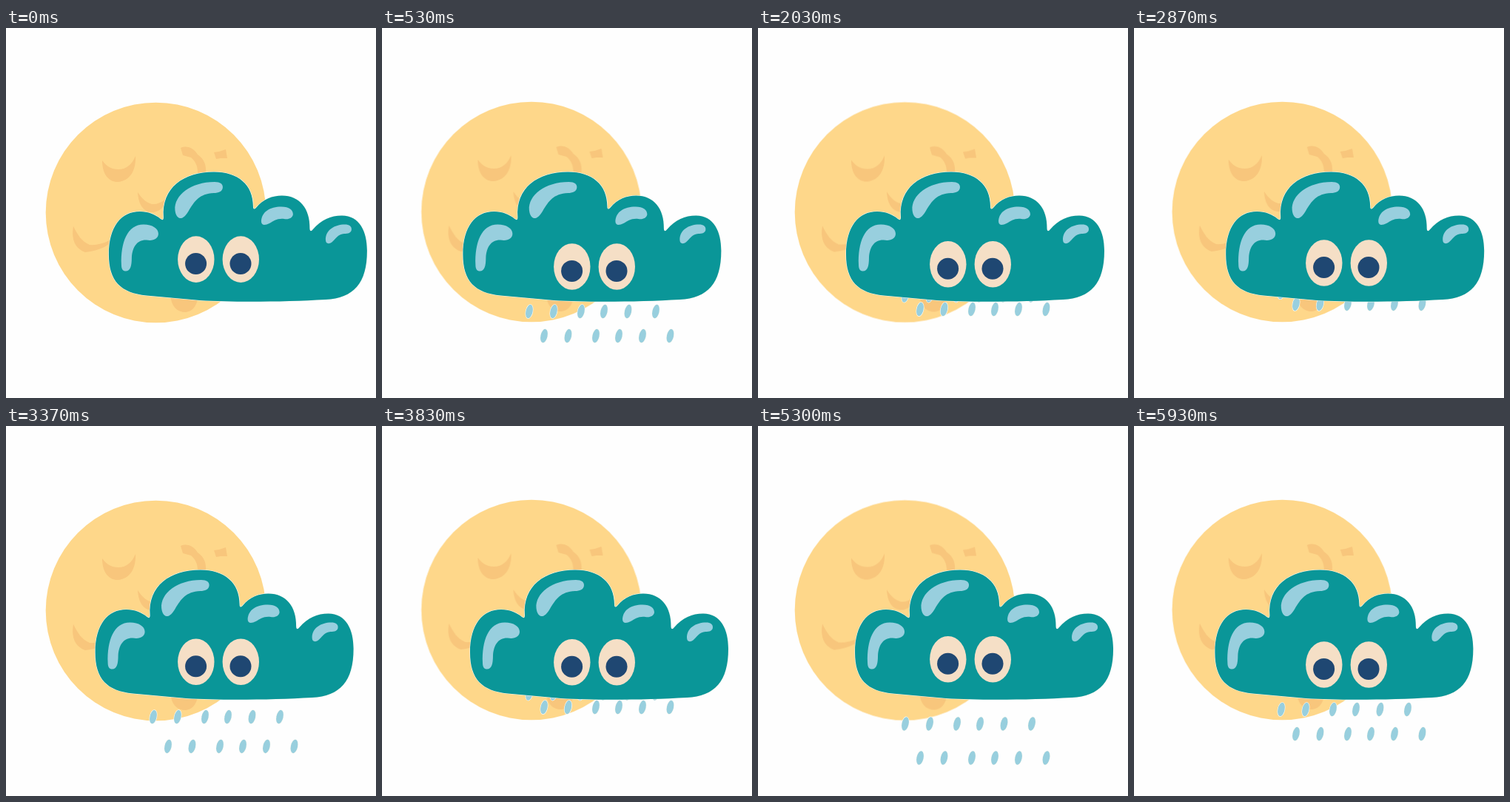
These frames come from a looping animation (500 px wide and 500 px high, 5960 ms). An HTML page without scripts:

```html
<!DOCTYPE html>
<html lang="en">
<head>
<meta charset="utf-8">
<title>Rain cloud and moon</title>
<style>
  @property --swing { syntax: "<number>"; inherits: true; initial-value: 0; }
  @property --fall { syntax: "<number>"; inherits: true; initial-value: 0; }

  html, body { margin: 0; width: 100%; height: 100%; overflow: hidden; background: #fefefe; }

  svg {
    display: block;
    width: 100%;
    height: 100%;
    animation: swing 5.96s linear infinite, fall 5.96s linear infinite;
  }

  .moon { fill: #fed78a; animation: wobble 5.96s step-end infinite; }
  .craters { fill: #f8c67c; }
  .cloud { transform: translateX(calc(var(--swing) * -37.5px)); }
  .body, .drops { stroke: #fdfaf2; stroke-width: 1.2; stroke-linejoin: round; paint-order: stroke; }
  .body { fill: #0a9698; }
  .shine, .drops { fill: #98cfde; }
  .eyes { fill: #f5dfc6; transform: translateY(calc(var(--swing) * 12.5px)); }
  .pupils { fill: #1f4772; }
  .near { transform: translateY(calc(352.4px + var(--fall) * 108px)); }
  .far { transform: translateY(calc(345px + var(--fall) * 64.5px)); }

  /* 900 ms cycles, the last one cut short by the loop */
  @keyframes swing {
    0%, 15.1007%, 30.2013%, 45.302%, 60.4027%, 75.5034%, 90.604% { --swing: 0; }
    7.2651%, 22.3658%, 37.4664%, 52.5671%, 67.6678%, 82.7685%, 97.8691% { --swing: 1; }
    100% { --swing: .728; }
  }

  @keyframes fall {
    0%, 15.1007%, 30.2013%, 45.302%, 60.4027%, 75.5034%, 90.604% { --fall: 0; }
    15.1%, 30.2%, 45.301%, 60.402%, 75.503%, 90.603% { --fall: 1; }
    100% { --fall: .622; }
  }

  /* six poses of 500 ms */
  @keyframes wobble {
    0%, 50.3356% { transform: translate(0, 0); }
    8.3893%, 58.7248% { transform: translate(-.5px, -1px); }
    16.7785%, 67.1141% { transform: translate(-1.2px, -1px); }
    25.1678%, 75.5034% { transform: translate(-3px, -1px); }
    33.557%, 83.8926% { transform: translate(-4px, -.5px); }
    41.9463%, 92.2819% { transform: translate(-2.2px, -1px); }
  }
</style>
</head>
<body>
<svg viewBox="0 0 500 500">
  <defs>
    <filter id="rough" color-interpolation-filters="sRGB">
      <feTurbulence type="fractalNoise" baseFrequency=".09" numOctaves="2" seed="4"/>
      <feDisplacementMap in="SourceGraphic" scale="1.5" xChannelSelector="R" yChannelSelector="G"/>
    </filter>
    <ellipse id="drop" rx="4.6" ry="9.4" transform="rotate(12)"/>
  </defs>

  <g class="moon">
    <g filter="url(#rough)">
      <circle cx="202.5" cy="249.5" r="148.8"/>
      <g class="craters">
        <path d="M130 179C130 198 139 208 151 208C167 207 176 193 175 173C170 185 162 191 152 191C142 191 136 187 130 179Z"/>
        <path d="M236 162C246 158 254 163 259 171C268 177 271 186 270 196L259 196C259 186 256 180 250 175L239 172Z"/>
        <path d="M281 168L288 167L297 164L299 176L290 176L284 177Z"/>
        <path d="M178 222C179 240 187 250 200 249Q214 246 216 231Q206 239 197 238Q186 235 178 222Z"/>
        <path d="M91 268C88 285 93 298 107 303Q130 300 140 291V287Q126 294 113 293C102 288 97 280 91 268Z"/>
        <path d="M222 360Q224 384 243 384Q256 382 259 366Z"/>
      </g>
    </g>
  </g>

  <g class="drops">
    <g class="far">
      <use href="#drop" x="199"/><use href="#drop" x="232"/><use href="#drop" x="269"/>
      <use href="#drop" x="300"/><use href="#drop" x="332.5"/><use href="#drop" x="370"/>
    </g>
    <g class="near">
      <use href="#drop" x="219"/><use href="#drop" x="251.5"/><use href="#drop" x="289"/>
      <use href="#drop" x="320"/><use href="#drop" x="352"/><use href="#drop" x="389.5"/>
    </g>
  </g>

  <g class="cloud">
    <path class="body" d="M139 306C139 268 156 248 181 248C192 248 202 252 209 258Q213 261 213 256C210 216 240 194.500 281 194.500C314 194.500 334 212 334 241Q334 247 338 243C348 231 360 226.500 373 226.500C397 226.500 411 244 410.500 271Q411 277 415 272C426 259 439 253.500 454 253.500C478 253.500 488 275 488 301C488 345 470 365 432 367C380 370 310 371 262 368L190 361.500C155 358 139 342 139 306Z"/>
    <g class="shine">
      <path d="M156 320C155 290 164 265.500 186 265.500C198 265.500 206 271 206 278C206 285 199 288 190 286.500C177 286 171 296 170 310C170 322 168 328.500 162 328.500C158 328.500 156 326 156 320Z"/>
      <path d="M228.500 246C227 226 250 208 282 208C290 208 293 211 293 215C293 221 287 223 281 223C261 224 255 234 247 247C243 254 239 257.500 235 257C231 256 229 251 228.500 246Z"/>
      <path d="M345 261C346 248 357 241.500 372 241.500C383 241.500 388 246 388 252C387 257 382 259 376 258C366 257 362 261 356 264C350 267 345 267 345 261Z"/>
      <path d="M432 286C432 273 444 265.500 458 265.500C464 265.500 467 268 467 272C467 277 462 278 457 278C449 279 447 283 442 288C437 293 432 292 432 286Z"/>
    </g>
  </g>

  <g class="eyes">
    <ellipse cx="256.8" cy="312.6" rx="24.7" ry="31.3"/>
    <ellipse cx="317.3" cy="312.6" rx="24.7" ry="31.3"/>
    <g class="pupils">
      <circle cx="256.6" cy="318.5" r="14.5"/>
      <circle cx="317" cy="318.5" r="14.5"/>
    </g>
  </g>
</svg>
</body>
</html>
```
